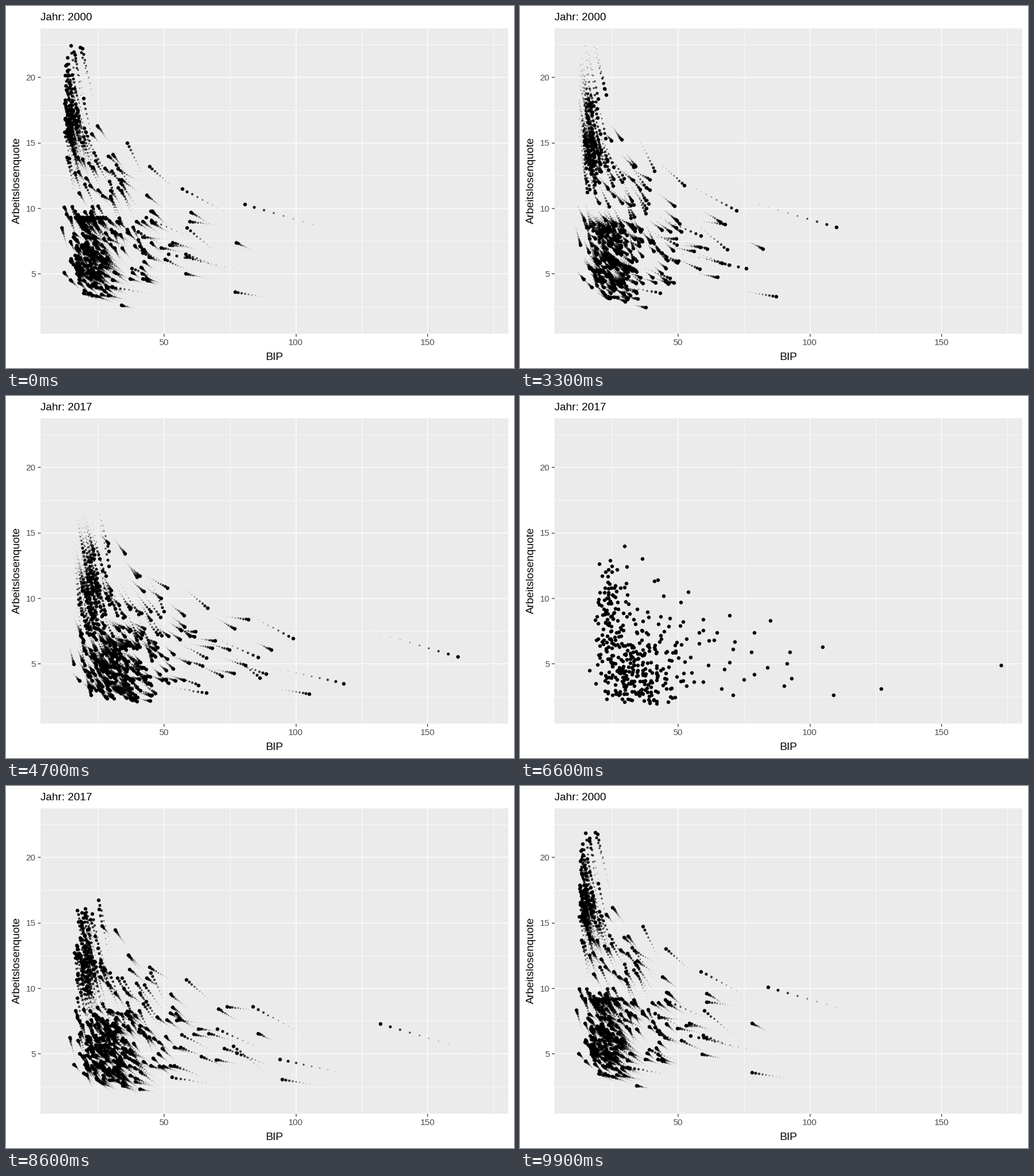
Animation of 885x632 px, one loop 10 s. Source, as a matplotlib script:

```python
import numpy as np
import matplotlib.pyplot as plt
from matplotlib.animation import FuncAnimation

W, H, DPI = 885, 632, 100
LEFT, TOP, RIGHT, BOTTOM = 60, 39, 875, 571.5
FRAMES, INTERVAL = 100, 100
WAKE = 12
PX = 72 / DPI

plt.rcParams["font.family"] = "Liberation Sans"

# Districts away from the crowd: GDP and unemployment in 2000, then in 2017
OUTLIERS = np.array([
    (80.6, 10.3, 172.5, 4.9), (76.9, 3.6, 109, 2.6), (77.4, 7.4, 92.4, 5.9),
    (56.9, 11.5, 104.8, 6.3), (44.5, 13.2, 69.5, 8.7), (36.1, 15, 52, 8.2),
    (58.7, 8.5, 90.2, 3.3), (60.2, 9.7, 79, 7.4), (59.8, 9, 85.1, 8.3),
    (58.3, 5, 79, 4.2), (50.4, 6.1, 75, 3.8), (33.8, 2.6, 46.4, 2.1),
    (58.8, 6.3, 84, 4.7), (58.2, 6.5, 93, 3.9), (51.8, 6.5, 127.1, 3.1),
    (43.2, 9.3, 91.4, 5), (53.3, 7.4, 77.8, 5.9), (52.2, 7.2, 71.6, 6.7),
    (49, 7, 70.9, 6.1), (30.2, 4, 70.9, 2.6), (37.9, 5.4, 66.5, 3.1),
    (43.7, 4.5, 51.9, 3.7), (43.5, 11, 59.6, 8.4), (32.5, 13, 53.9, 10.5),
    (33.8, 12.2, 51, 9.7), (45.5, 8.9, 63.7, 6.8), (42, 7.8, 64.7, 7.4),
    (40.2, 8.2, 69.6, 5.1), (42, 6.6, 67.6, 4.6), (18.2, 22.3, 30.7, 12.4),
    (24.8, 16.3, 36.6, 13), (29, 14, 42.4, 11.4), (30.7, 14.1, 41, 11.3),
    (22.5, 15.7, 29.8, 14), (11.3, 8.5, 16.5, 4.5), (12.1, 5.1, 18.8, 3.5),
    (12.2, 10.1, 19.7, 6.9),
])


def group(rng, x, y, growth, drop):
    """Districts whose GDP grows and unemployment shrinks by random factors."""
    n = len(x)
    end_y = np.maximum(y * rng.uniform(*drop, n), 1.5 + 0.8 * rng.random(n))
    return np.column_stack([x, y, x * rng.uniform(*growth, n), end_y])


def make_districts():
    rng = np.random.default_rng(17)

    n = 90
    east_y = np.where(rng.random(n) < 0.55, rng.normal(16.2, 1.3, n),
                      rng.uniform(15, 22.7, n))
    east_x = 12.2 + rng.gamma(1.7, 1.7, n)
    east_x = np.minimum(east_x, 25.5 - 0.45 * np.maximum(east_y - 15, 0))
    east = group(rng, east_x, east_y, (1.45, 1.85), (0.38, 0.64))

    n = 200
    west_x = np.clip(rng.normal(21.5, 3.8, n), 14.5, 31.5)
    west_y = np.clip(6.3 * np.exp(rng.normal(0, 0.27, n)) - 0.1 * (west_x - 21),
                     3.1 + 0.6 * rng.random(n), 9.3)
    west = group(rng, west_x, west_y, (1.3, 1.72), (0.45, 0.86))

    n = 45
    mid_x = rng.uniform(13, 34, n)
    mid_y = rng.uniform(9, 14.3, n) - 0.05 * (mid_x - 13)
    mid = group(rng, mid_x, mid_y, (1.25, 1.65), (0.52, 0.82))

    n = 28
    rich_x = rng.uniform(31, 46, n)
    rich_y = rng.uniform(4.6, 9.8, n)
    rich = group(rng, rich_x, rich_y, (1.15, 1.4), (0.55, 0.82))

    return np.vstack([OUTLIERS, east, west, mid, rich])


districts = make_districts()
start, end = districts[:, :2], districts[:, 2:]


def progress(n):
    """0 is the year 2000, 1 is 2017; both rest for a quarter of the loop."""
    n %= FRAMES
    return np.clip((n - 25) / 25, 0, 1) - np.clip((n - 75) / 25, 0, 1)


fig = plt.figure(figsize=(W / DPI, H / DPI), dpi=DPI, facecolor="white")
ax = fig.add_axes([LEFT / W, 1 - BOTTOM / H, (RIGHT - LEFT) / W, (BOTTOM - TOP) / H],
                  facecolor="#EBEBEB")
ax.set(xlim=(3.21, 180.6), ylim=(0.45, 23.73))
ax.set_xticks([50, 100, 150], labels=[])
ax.set_yticks([5, 10, 15, 20], labels=[])
ax.set_xticks([25, 75, 125, 175], minor=True)
ax.set_yticks(np.arange(2.5, 23, 5), minor=True)
ax.set_axisbelow(True)
ax.grid(which="major", color="white", lw=1.4 * PX)
ax.grid(which="minor", color="white", lw=0.7 * PX)
ax.tick_params(which="major", length=4.6 * PX, width=1.3 * PX, color="#333333")
ax.tick_params(which="minor", length=0)
for spine in ax.spines.values():
    spine.set_visible(False)


def label(x, y, text, size=19, color="black", **kwargs):
    return fig.text(x / W, 1 - y / H, text, fontsize=size * PX, color=color, **kwargs)


for value in (50, 100, 150):
    label(45.25 + 4.595 * value, 592.5, str(value), 15.3, "#4D4D4D", ha="center")
for value in (5, 10, 15, 20):
    label(51.5, 587.3 - 22.87 * value, str(value), 15.3, "#4D4D4D", ha="right")
label(467.5, 618, "BIP", ha="center")
label(25.5, 305, "Arbeitslosenquote", rotation=90, ha="right", va="center",
      rotation_mode="default").set_x(27.5 / W)
title = label(60, 25, "")


def dots(radius, alpha, zorder):
    return ax.scatter(*start.T, s=(2 * radius * PX) ** 2, color="black",
                      alpha=alpha, linewidths=0, zorder=zorder)


layers = [dots(3.2, 1, 5)]
for k in range(1, WAKE + 1):
    fade = (1 - k / (WAKE + 0.5)) ** 3
    layers.append(dots(2.6 * fade + 0.6, fade ** 0.5, 5 - k / 10))


def update(n):
    now = progress(n)
    for k, layer in enumerate(layers):
        t = progress(n - k)
        layer.set_visible(k == 0 or t != now)
        layer.set_offsets(start + (end - start) * t)
    title.set_text("Jahr: 2017" if 37 <= n < 87 else "Jahr: 2000")
    return [*layers, title]


anim = FuncAnimation(fig, update, frames=FRAMES, interval=INTERVAL,
                     repeat=True, repeat_delay=0, blit=False)
plt.show()
```
